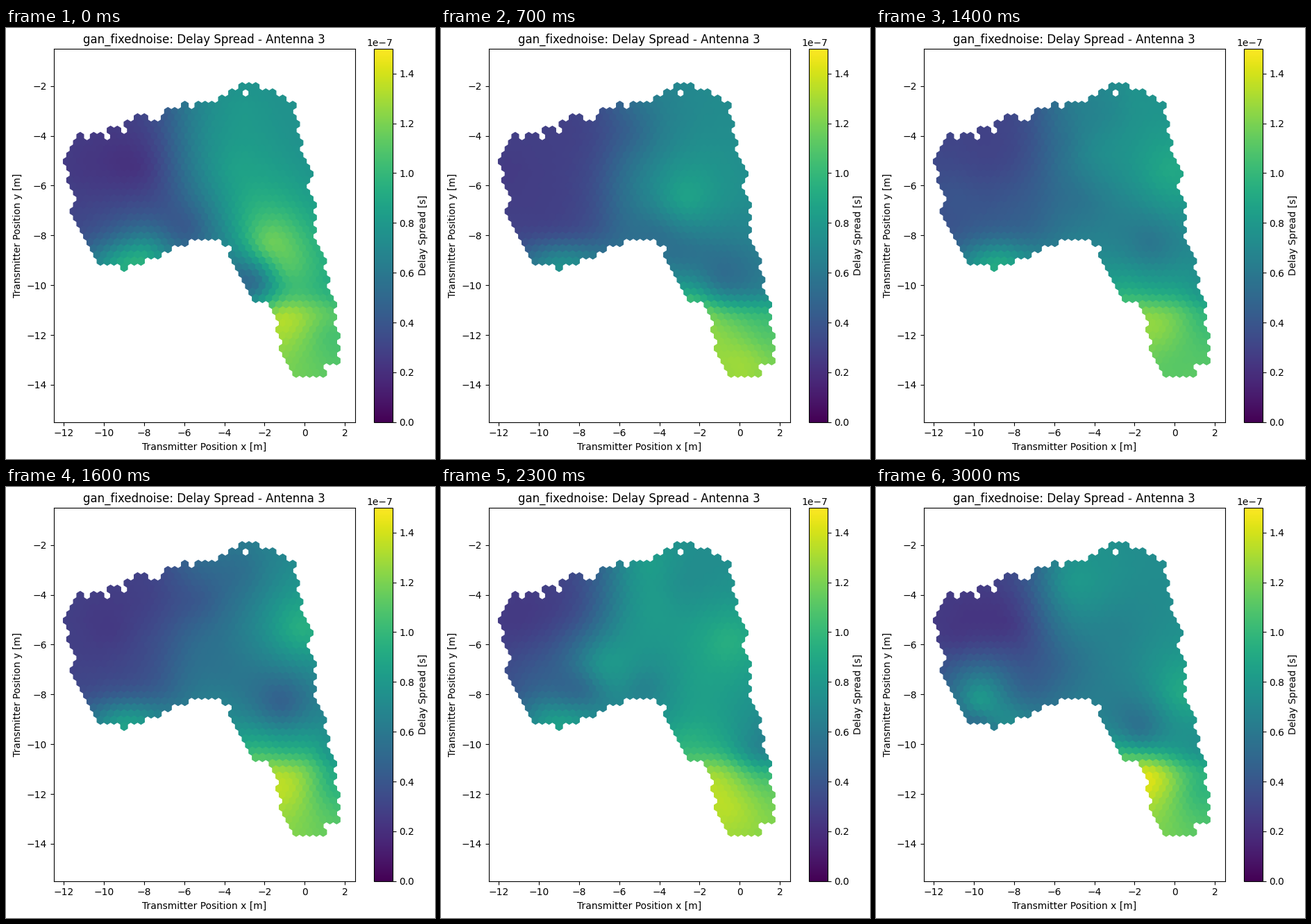
A matplotlib script that plays this animation: 618x622 px, repeating every 3100 ms.

```python
import numpy as np
import matplotlib.pyplot as plt
from matplotlib.animation import FuncAnimation
from matplotlib.cm import ScalarMappable
from matplotlib.collections import PolyCollection
from matplotlib.colors import Normalize

W, H, DPI = 618, 622, 100
FRAMES, INTERVAL = 31, 100
AX_LEFT, AX_TOP, AX_W, AX_H = 68.64, 29.77, 434, 539
XLIM, YLIM = (-12.5, 2.5), (-15.5, -0.5)

# Hexagonal lattice in stage pixels, counted in half cells across and rows down
X0, Y0, HALF, ROW = 87.5, 84.8, 4.86, 8.985
COLS, ROWS = 81, 47
HOLES = {(53, 1), (37, 3), (25, 5), (27, 5), (17, 7), (6, 8), (12, 8)}

# Outline of the measured area as (row, half cell) corners
LEFT = [(0, 51.5), (2, 45.5), (3, 34.5), (4, 29), (5, 20), (7, 12.5),
        (8, 3.8), (12, -.2), (13, .3), (15, .9), (18, 2.4), (20, 1.6),
        (28, 9.6), (29, 16.5)]
RIGHT = [(0, 57), (1, 61.5), (3, 67.4), (12, 70.5), (14, 72), (16, 71.5),
         (19, 73.2), (25, 73.5), (28, 76.3), (31, 77.2), (35, 79.3),
         (39, 79.9), (40, 80.2), (44, 80.2), (45, 76), (46, 76.5)]
NOTCH_RIGHT = [(25, 46.5), (26, 48.4), (27, 48.6), (34, 55.5), (35, 60.5),
               (38, 62.6), (42, 63.4), (46, 67.2)]


def edge(corners, row):
    return np.interp(row, *zip(*corners))


def inside(u, row):
    in_outline = edge(LEFT, row) <= u <= edge(RIGHT, row)
    notch_left = 36 - 4.4 * (row - 25)
    in_notch = row >= 25 and notch_left < u < edge(NOTCH_RIGHT, row)
    return in_outline and not in_notch and (u, row) not in HOLES


CELLS = np.array([(X0 + HALF * u, Y0 + ROW * row)
                  for row in range(ROWS) for u in range(row % 2, COLS, 2)
                  if inside(u, row)])


def sigmoid(t):
    return 1 / (1 + np.exp(-t))


def base(p):
    """Common trend in ns: dark west, teal east, bright south tail."""
    x, y = p[:, 0], p[:, 1]
    corner = np.exp(-((x - 175) / 70) ** 2 - ((y - 345) / 35) ** 2)
    return (30 + 42 * sigmoid((x - 245) / 22) + 45 * corner
            + 46 * sigmoid((y - 398) / 10))


def kernel(a, b, scale=30):
    d = np.linalg.norm(a[:, None] - b[None], axis=-1) / scale
    return (1 + d) * np.exp(-d)


def field(points):
    """Bend the common trend smoothly through (x, y, ns) points."""
    data = np.array(points, float)
    pts, vals = data[:, :2], data[:, 2]
    weights = np.linalg.solve(kernel(pts, pts) + 0.02 * np.eye(len(pts)),
                              vals - base(pts))
    ns = base(CELLS) + kernel(CELLS, pts) @ weights
    return np.clip(ns, 21, 143) * 1e-9


KEYS = {
    0: field([(190, 200, 22), (115, 200, 24), (205, 315, 78), (262, 292, 42),
              (340, 115, 80), (325, 200, 84), (350, 250, 92), (375, 315, 114),
              (402, 352, 106), (360, 365, 55), (395, 415, 130),
              (465, 385, 97), (465, 440, 107)]),
    7: field([(95, 205, 26), (150, 285, 30), (195, 190, 30), (275, 150, 47),
              (350, 250, 85), (310, 295, 55), (348, 330, 56), (405, 363, 54),
              (360, 391, 102), (440, 480, 127), (468, 440, 108)]),
    11: field([(115, 240, 56), (182, 190, 37), (200, 260, 54),
               (175, 335, 98), (245, 150, 62), (310, 180, 98),
               (372, 105, 95), (285, 245, 56), (430, 250, 88),
               (365, 380, 86), (468, 450, 112), (415, 485, 96)]),
    16: field([(150, 205, 25), (205, 220, 34), (170, 340, 84),
               (280, 165, 41), (340, 120, 54), (310, 260, 57),
               (425, 205, 94), (397, 315, 46), (360, 380, 100),
               (440, 385, 95), (412, 440, 132), (470, 420, 92)]),
    20: field([(115, 240, 29), (160, 190, 31), (205, 290, 38),
               (228, 257, 92), (250, 290, 74), (310, 170, 90),
               (425, 220, 90), (290, 290, 45), (370, 300, 60),
               (345, 345, 50), (406, 388, 110), (430, 465, 142),
               (465, 400, 98)]),
    26: field([(110, 200, 23), (200, 190, 31), (150, 308, 82),
               (130, 265, 53), (200, 255, 60), (300, 112, 88),
               (345, 140, 65), (410, 225, 100), (356, 290, 108),
               (348, 362, 128), (455, 400, 68), (402, 455, 130)]),
    30: field([(120, 220, 26), (190, 200, 24), (150, 309, 82),
               (150, 338, 55), (278, 140, 78), (270, 260, 50),
               (350, 200, 67), (438, 300, 90), (380, 355, 58),
               (357, 391, 112), (398, 408, 135), (465, 435, 98)]),
}


def values_at(step):
    start = max(k for k in KEYS if k <= min(step, FRAMES - 2))
    end = min(k for k in KEYS if k > start)
    t = (step - start) / (end - start)
    return (1 - t) * KEYS[start] + t * KEYS[end]


def to_data(p):
    x = XLIM[0] + (p[..., 0] - AX_LEFT) / AX_W * (XLIM[1] - XLIM[0])
    y = YLIM[1] - (p[..., 1] - AX_TOP) / AX_H * (YLIM[1] - YLIM[0])
    return np.stack([x, y], axis=-1)


def stage_box(x, y, w, h):
    return [x / W, 1 - (y + h) / H, w / W, h / H]


fig = plt.figure(figsize=(W / DPI, H / DPI), dpi=DPI, facecolor="white")
ax = fig.add_axes(stage_box(AX_LEFT, AX_TOP, AX_W, AX_H))
ax.set(xlim=XLIM, ylim=YLIM, xlabel="Transmitter Position x [m]",
       ylabel="Transmitter Position y [m]",
       title="gan_fixednoise: Delay Spread - Antenna 3")
ax.set_xticks(range(-12, 3, 2))
ax.set_yticks(range(-14, -1, 2))

angles = np.radians(30 + 60 * np.arange(6))
hexagon = np.column_stack([2 * HALF / np.sqrt(3) * np.cos(angles),
                           2 * ROW / 3 * np.sin(angles)])
norm = Normalize(0, 1.5e-7)
hexes = PolyCollection(to_data(CELLS[:, None, :] + hexagon), cmap="viridis",
                       norm=norm, edgecolors="face", linewidths=1)
hexes.set_array(values_at(0))
ax.add_collection(hexes, autolim=False)

cax = fig.add_axes(stage_box(AX_LEFT + 461.125, AX_TOP, 26.95, AX_H))
fig.colorbar(ScalarMappable(norm, "viridis"), cax=cax,
             label="Delay Spread [s]")


def update(step):
    hexes.set_array(values_at(step))
    return [hexes]


anim = FuncAnimation(fig, update, frames=FRAMES, interval=INTERVAL,
                     repeat=True, repeat_delay=0, blit=False)
plt.show()
```
